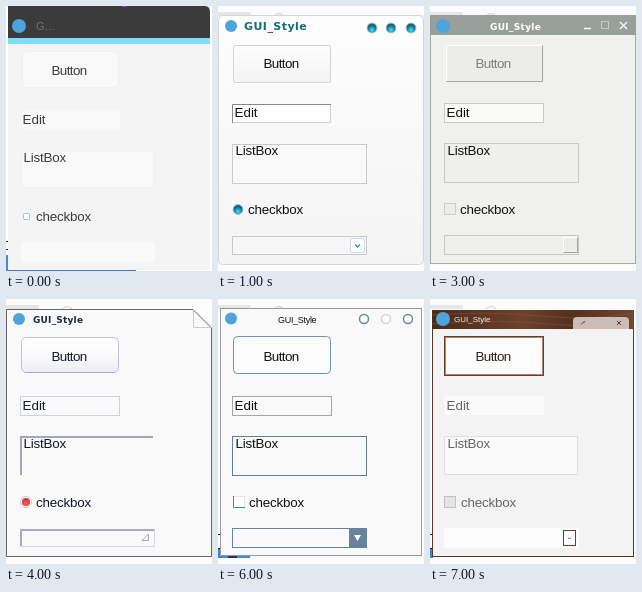
Recreate the animation shown at these times as an HTML page. Size 206x265 px, loop 8 s.

```html
<!DOCTYPE html>
<html lang="en">
<head>
<meta charset="utf-8">
<title>Window skins</title>
<style>
html, body { margin: 0; width: 100%; height: 100%; overflow: hidden; background: #fcfcfc; }
svg { display: block; width: 206px; height: 265px; }
text { font: 13.4px "Liberation Sans", Arial, sans-serif; }
.skin { visibility: hidden; animation: show 8s step-end infinite; animation-delay: calc(var(--i) * 1s - 8s); }
@keyframes show {
  0% { visibility: visible; }
  12.5%, 100% { visibility: hidden; }
}
</style>
</head>
<body>
<svg id="stage" viewBox="0 0 206 265">
  <defs>
    <linearGradient id="face" x2="0" y2="1">
      <stop stop-color="#fff"/><stop offset=".55" stop-color="#fafafb"/><stop offset="1" stop-color="#ececf2"/>
    </linearGradient>
    <linearGradient id="soft" x2="0" y2="1">
      <stop stop-color="#fdfdfd"/><stop offset="1" stop-color="#f4f4f4"/>
    </linearGradient>
    <linearGradient id="wood">
      <stop stop-color="#4a2a1b"/><stop offset=".45" stop-color="#6d412b"/>
      <stop offset=".7" stop-color="#54301f"/><stop offset="1" stop-color="#714630"/>
    </linearGradient>
    <radialGradient id="teal" cy=".7">
      <stop stop-color="#5fd6ee"/><stop offset=".6" stop-color="#1795b8"/><stop offset="1" stop-color="#0d6482"/>
    </radialGradient>
    <radialGradient id="red" cy=".65">
      <stop stop-color="#f06a60"/><stop offset="1" stop-color="#d03a38"/>
    </radialGradient>
  </defs>
</svg>
<script>
const rect = (x, y, w, h, fill, line, r = 0) => line
  ? `<rect x="${x + .5}" y="${y + .5}" width="${w - 1}" height="${h - 1}" rx="${r}" fill="${fill}" stroke="${line}"/>`
  : `<rect x="${x}" y="${y}" width="${w}" height="${h}" rx="${r}" fill="${fill}"/>`;
const dot = (x, y, r, fill, line = 'none', w = 1) =>
  `<circle cx="${x}" cy="${y}" r="${r}" fill="${fill}" stroke="${line}" stroke-width="${w}"/>`;
const path = (d, line, fill = 'none', w = 1) =>
  `<path d="${d}" stroke="${line}" fill="${fill}" stroke-width="${w}"/>`;
const text = (x, y, s, fill, style = '') => `<text x="${x}" y="${y}" fill="${fill}" style="${style}">${s}</text>`;
const logo = (x = 13, y = 20, r = 6) => dot(x, y, r, '#4fa3dc');
const title = (x, y, fill, style) => text(x, y, 'GUI_Style', fill, style);
const wide = (size, gap) => `font:bold ${size}px 'DejaVu Sans',sans-serif;letter-spacing:${gap}px`;

const labels = (fill, { dy = 0, button = fill, check = 30 } = {}) =>
  text(45.5, 61.5 + dy, 'Button', button, 'letter-spacing:-.6px') +
  text(16.5, 110.5 + dy, 'Edit', fill) +
  text(17.5, 149 + dy, 'ListBox', fill, 'letter-spacing:-.2px') +
  text(check, 207.5 + dy, 'checkbox', fill, 'letter-spacing:-.2px');

const raised = (x, y, w, h) => rect(x, y, w, h, '#ecece8', '#c4c6c2') +
  path(`M${x + .5} ${y + h - 1}V${y + .5}H${x + w - 1}`, '#fff') +
  path(`M${x + 1} ${y + h - .5}H${x + w - .5}V${y + 1}`, '#a4a7a2');

const desk = rect(0, 0, 206, 265, '#fcfcfc') + rect(0, 6, 33, 4, '#e6e6e6') +
  path('M56 10Q61 5 66 10', '#ccc');
const corner = path('M0 235.5H3M0 249.5H3', '#222') + rect(0, 250, 3, 9, '#3f86d8');

const graphite = () =>
  rect(0, 0, 206, 265, '#fff') + rect(0, 249, 2, 16, '#4a86dc') + path('M0 235.5H2M0 243.5H2', '#222') +
  rect(2, 30, 202, 234, '#f4f4f4') + path('M2 264.5H130', '#4a78b8') +
  path('M2 32V0H199Q204 0 204 6V32Z', 'none', '#3b3b3b') + rect(2, 32, 202, 6, '#7fdcfb') +
  rect(116, 0, 5, 1, '#a03a9c') + logo(13, 20, 7) +
  text(30, 24, 'G...', '#747474', 'font-size:11px;letter-spacing:.3px') +
  rect(16, 45, 97, 37, '#f9f9f9', '#f0f0f0', 4) + rect(16, 104, 98, 20, '#f9f9f9') +
  rect(15, 145, 133, 37, '#f9f9f9', '#f1f1f1', 2) + rect(15, 236, 134, 20, '#f9f9f9') +
  rect(17, 207, 7, 7, '#fcfcfc', '#7fd0e4', 1) + labels('#3c3c3c', { dy: 7 });

const aqua = () => desk + rect(0, 9, 206, 250, 'url(#soft)', '#d4d4d4', 4) + logo() +
  title(26, 24, '#126d7c', wide(11, .45)) +
  [154, 173, 193].map(x => dot(x, 22, 5, 'url(#teal)', '#b9c5c9')).join('') +
  rect(15, 39, 98, 38, 'url(#soft)', '#d2d2d2', 2) +
  rect(14, 98, 99, 19, '#fff', '#d0d0d0') + path('M14.5 117V98.5H113', '#888') +
  rect(14, 138, 135, 40, '#f9f9f9', '#c9c9c9') + dot(20, 203.5, 5, 'url(#teal)', '#b9c5c9') +
  rect(14, 230, 135, 19, '#f7f7f7', '#c9c9c9') + rect(132, 232, 15, 15, '#fff', '#c5dce3', 2) +
  path('M137 238.5L139.5 241L142 238.5', '#189ab8', 'none', 1.4) + labels('#111');

const plain = (accent, line) => desk + rect(0, 9, 206, 250, '#f6f6f6', line, 3) +
  rect(1, 10, 204, 19, accent) + logo() + title(28, 24, '#444', wide(9, .3)) +
  path('M154 22.5H160M171.5 17.5h6v6h-6zM190 17L196 23M196 17L190 23', '#888') +
  rect(14, 38, 100, 38, 'url(#face)', line, 3) + rect(14, 97, 100, 20, '#fbfbfb', line) +
  rect(14, 137, 135, 40, '#fbfbfb', line) + rect(14, 197, 12, 12, '#fff', line) +
  rect(14, 229, 135, 20, '#f9f9f9', line) + path('M136 237H144L140 241Z', 'none', '#777') + labels('#222');

const stone = () => desk + rect(0, 9, 206, 249, '#f0f1ec', '#a4aaa4') + rect(0, 9, 206, 20, '#98a099') +
  logo(13, 20, 7) + title(60, 24, '#fff', wide(9, .3)) +
  path('M154 22.5H161M190 16L197 23M197 16L190 23', '#f8f8f8', 'none', 1.3) +
  rect(171, 15, 8, 8, 'none', '#c6cbc6') +
  raised(16, 39, 97, 37) + rect(14, 97, 100, 20, '#fafafa', '#c6c9c5') +
  rect(14, 137, 135, 40, '#eff0ec', '#c6c9c5') + rect(14, 197, 12, 12, '#ecece8', '#cacdc8') +
  rect(14, 229, 135, 20, '#eff0ec', '#c6c9c5') + raised(133, 231, 15, 16) +
  labels('#111', { button: '#7d7d7d' });

const paper = () => desk + path('M.5 257.5V10.5H187L205.5 29V257.5Z', '#666', '#f9f9fa') +
  path('M187.5 11V28.5H205', '#ccc') + logo() + title(27, 24, '#1f2746', wide(9, .2)) +
  rect(15, 38, 98, 36, 'url(#face)', '#bfc0d2', 5) + path('M19 73.5H109', '#a9abc2') +
  rect(14, 97, 100, 20, '#fafafb', '#d0d1de') + path('M15 176V138H147', '#a3a5c2', 'none', 2) +
  dot(20, 203, 5.5, '#fff', '#c4c4cc') + dot(20, 203, 4, 'url(#red)') +
  rect(14, 230, 135, 18, '#fafafb', '#d2d3e0') + path('M15 247V231H148', '#a9abc6', 'none', 2) +
  path('M136 241.5H142.5V235Z', '#a4a6b8') + labels('#14182c');

const slate = () => desk + corner + rect(3, 256, 29, 3, '#3f86d8') + rect(10, 257, 9, 2, '#26344a') +
  rect(2, 9, 202, 248, '#f9f9f9', '#999') + logo(13, 19.5) +
  title(60, 23.5, '#111', 'font-size:9px;letter-spacing:-.3px') +
  dot(146, 20, 4.5, '#fff', '#6d87a3', 1.5) + dot(168, 20, 4.5, '#fff', '#d0d5da', 1.5) +
  dot(190, 20, 4.5, '#fff', '#6d87a3', 1.5) +
  rect(15, 37, 98, 38, '#fcfcfc', '#7291b0', 4) + rect(14, 97, 100, 20, '#fafafa', '#a6a6a6') +
  rect(14, 137, 135, 40, '#fafafa', '#5e7e9e') + rect(15, 197, 12, 12, '#fff', '#dfe4e9') +
  path('M15.5 197V208.5H27', '#5e7e9e') +
  rect(14, 229, 135, 20, '#fafafa', '#66829e') + rect(131, 230, 18, 18, '#69829b') +
  path('M136 236H143L139.5 242Z', 'none', '#fff') + labels('#111', { check: 31 });

const walnut = () => desk + corner + rect(2, 11, 202, 247, '#f3f3f3', '#5c3522') +
  rect(2, 11, 202, 19, 'url(#wood)') +
  path('M2 16Q60 12 110 17T204 14M2 25Q70 20 120 25T204 22', '#83553c', 'none', .6) +
  path('M143 30V22Q143 18 147 18H195Q199 18 199 22V30Z', 'none', '#c9bdb5') +
  path('M151 25.5L153 23.5L155 22.5M187 22L191 26M191 22L187 26', '#5c3522') +
  logo(13, 20, 7) + title(24, 23, '#f4eee9', 'font-size:8px') +
  rect(14, 37, 100, 40, '#fcfcfc', '#6b3d26') + rect(15, 38, 98, 38, 'none', '#a98672') +
  rect(14, 97, 100, 19, '#fafafa') + rect(14, 137, 134, 39, '#fafafa', '#dedede') +
  rect(14, 197, 12, 12, '#e4e4e4', '#c2c2c2') + rect(14, 229, 135, 20, '#fcfcfc') +
  rect(133, 231, 13, 16, '#fff', '#6b3d26') + path('M138 238.5L139.5 240L141 238.5', '#6b3d26') +
  labels('#666', { button: '#2e2019', check: 31 });

const skins = [graphite(), aqua(), plain('#e9ecec', '#c8cccc'), stone(),
  paper(), plain('#eceef4', '#bcc2cf'), slate(), walnut()];
document.getElementById('stage').insertAdjacentHTML('beforeend',
  skins.map((body, i) => `<g class="skin" style="--i:${i}">${body}</g>`).join(''));
</script>
</body>
</html>
```
